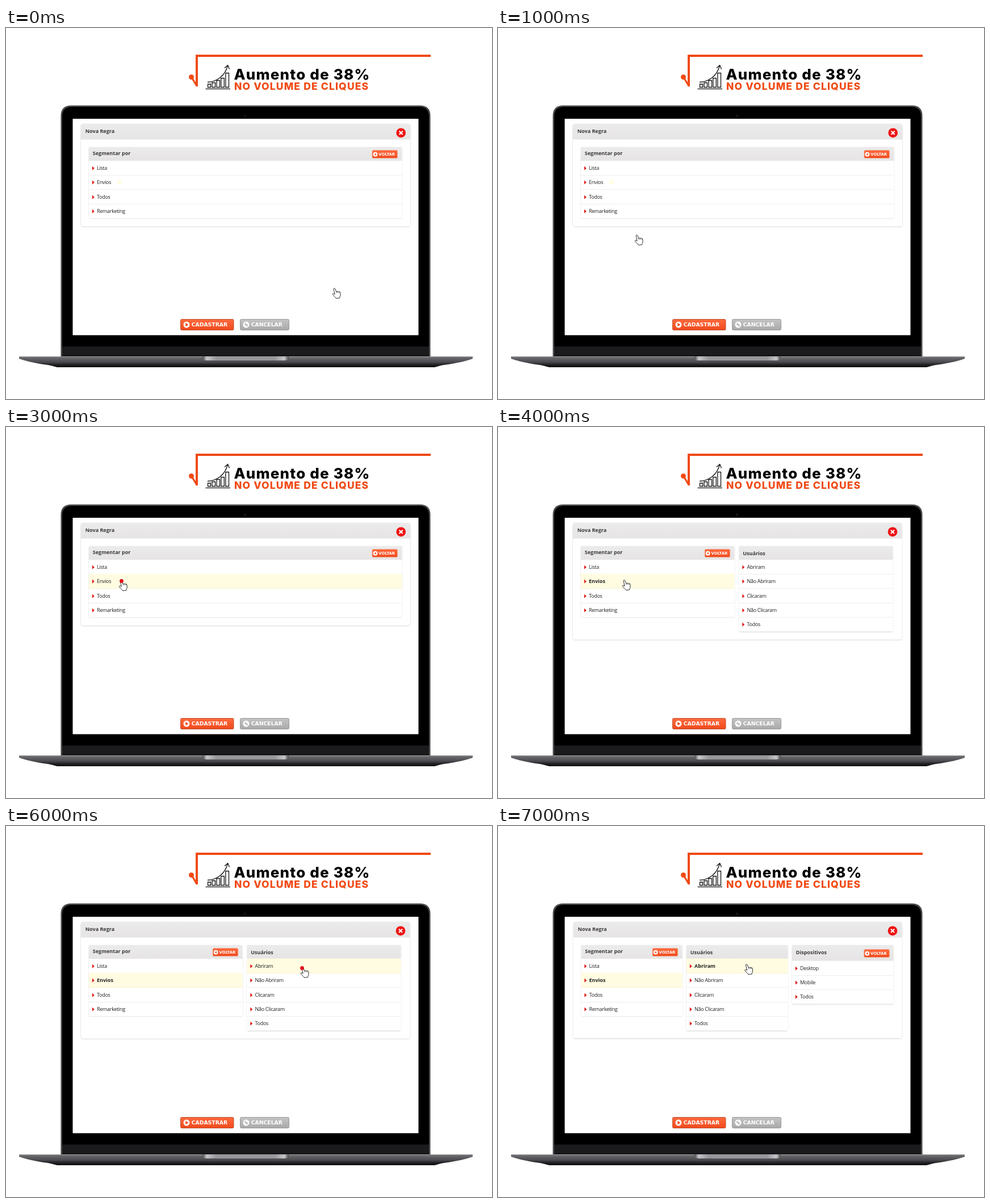
Animation of 856 by 654 pixels, one loop 8000 ms. Source, as an HTML page:

```html
<!DOCTYPE html>
<html lang="pt">
<head>
<meta charset="utf-8">
<style>
  html, body { margin: 0; width: 100%; height: 100%; overflow: hidden; background: #fff; }
  svg { display: block; width: 856px; height: 654px; }
  text { font-family: "Open Sans", sans-serif; font-size: 9px; fill: #3a3a3a; }
  .row { letter-spacing: -.3px; fill: #222; }
  .bold { font-weight: 700; }
  .chosen { fill: #222; }
  .btn { font: 700 9.3px "DejaVu Sans", sans-serif; fill: #fff; }
  .small { font-size: 6.8px; }
  .title { font: 800 26px Inter, sans-serif; letter-spacing: 1.2px; fill: #000; }
  .sub { font: 800 17.5px Inter, sans-serif; letter-spacing: 1.15px; fill: #f04a14; }
</style>
</head>
<body>
<svg viewBox="0 0 856 654">
  <defs>
    <linearGradient id="orange" x2="0" y2="1"><stop stop-color="#ff6a3e"/><stop offset="1" stop-color="#f04a1c"/></linearGradient>
    <linearGradient id="gray" x2="0" y2="1"><stop stop-color="#c4c4c4"/><stop offset="1" stop-color="#a9a9a9"/></linearGradient>
    <linearGradient id="head" x2="0" y2="1"><stop stop-color="#ecebeb"/><stop offset="1" stop-color="#e6e4e4"/></linearGradient>
    <linearGradient id="base" x2="0" y2="1">
      <stop stop-color="#8c8c90"/><stop offset=".15" stop-color="#66666a"/>
      <stop offset=".55" stop-color="#4b4b4f"/><stop offset=".8" stop-color="#222225"/><stop offset="1" stop-color="#111113"/>
    </linearGradient>
    <linearGradient id="notch">
      <stop stop-color="#4a4a4d"/><stop offset=".05" stop-color="#c6c6ca"/><stop offset=".16" stop-color="#98989c"/>
      <stop offset=".84" stop-color="#98989c"/><stop offset=".95" stop-color="#c6c6ca"/><stop offset="1" stop-color="#4a4a4d"/>
    </linearGradient>
    <filter id="shadow" x="-5%" y="-5%" width="110%" height="112%">
      <feDropShadow dx="0" dy=".7" stdDeviation="1.3" flood-color="#000" flood-opacity=".22"/>
    </filter>
  </defs>

  <!-- headline -->
  <g fill="none" stroke="#f04a14" stroke-width="4">
    <path d="M748 49H336V103"/>
    <path d="M327 87L336 102" stroke-width="3.2"/>
    <circle cx="326.5" cy="86.5" r="4.5" fill="#f04a14" stroke="none"/>
  </g>
  <g fill="none" stroke="#111" stroke-width="1.3">
    <path d="M351.5 107.3H395M355 95.5C372 95 386 84 390.5 66M385 70.5L390.7 65.5 393.5 72.5"/>
    <path d="M355.5 104.5V99H360.5V104.5ZM363 104.5V96.5H368.5V104.5ZM371 104.5V92.5H376.5V104.5ZM378.8 104.5V88.5H384.3V104.5ZM386.8 104.5V79.5H392.5V104.5Z"/>
  </g>
  <text class="title" x="401.5" y="91">Aumento de 38%</text>
  <text class="sub" x="402" y="108.5">NO VOLUME DE CLIQUES</text>

  <!-- laptop -->
  <path d="M96.5 579V155Q96.5 136.5 115 136.5H729Q747.5 136.5 747.5 155V579Z" fill="#48484b"/>
  <path d="M99 578V156Q99 139 116 139H728Q745 139 745 156V578Z" fill="#000"/>
  <path d="M99 561.5H745V577H99Z" fill="#1b1b1d"/>
  <circle cx="421" cy="154.5" r="2" fill="#15171c"/>
  <path d="M117.5 160H726.5V541.5H117.5Z" fill="#fff"/>
  <path d="M75 594H769L755 598H90Z" fill="#111"/>
  <path d="M23 579H822V583C805 589 775 595 740 597H105C70 595 40 589 23 583Z" fill="url(#base)"/>
  <path d="M346 579H498V582Q497 586 490 586H354Q347 586 346 582Z" fill="url(#notch)"/>

  <g id="view"></g>

  <!-- form buttons -->
  <g>
    <rect x="307.5" y="513.5" width="93.5" height="19" rx="2" fill="url(#orange)" stroke="#bd5230"/>
    <circle cx="318" cy="523" r="5.5" fill="#fff"/>
    <path d="M316.3 519.8L321.3 523 316.3 526.2Z" fill="#ee4a1c"/>
    <text class="btn" x="326.7" y="526.3">CADASTRAR</text>
    <rect x="412.5" y="513.5" width="86" height="19" rx="2" fill="url(#gray)" stroke="#9a9a9a"/>
    <circle cx="423" cy="523" r="5.5" fill="#fff"/>
    <path d="M420.7 521.2L425.3 525M421 523.8V521H423.6M425 522.2V525.3H422.4" fill="none" stroke="#aaa" stroke-width="1.1"/>
    <text class="btn" x="431.7" y="526.3">CANCELAR</text>
  </g>

  <g id="hand" stroke="#222" stroke-width=".95" stroke-linejoin="round">
    <path fill="#fff" d="M2.5 1.6Q3.8 -.2 5.2 1.5L7.2 6.8Q8.7 5.4 9.8 6.8 11.2 5.6 12.1 7 13.8 6.3 14.1 8L14.6 12Q14.5 14.6 13.2 16.6V18L6.9 18.6Q6 16.8 4.3 15.6L.8 11.7Q.7 9.6 2.7 10.2L4.6 11.4Z"/>
    <path fill="none" d="M7.2 6.8L7.9 9.4M9.8 6.8L10.3 9M12.1 7L12.5 8.8" stroke-width=".7"/>
  </g>
  <circle id="click" r="3.4" fill="#e3101c"/>
</svg>
<script>
const $ = id => document.getElementById(id);
const ROW = 25.3;
const SEGMENTS = ['Lista', 'Envios', 'Todos', 'Remarketing'];
const USERS = ['Abriram', 'Não Abriram', 'Clicaram', 'Não Clicaram', 'Todos'];
const DEVICES = ['Desktop', 'Mobile', 'Todos'];

// hand position for each second
const HAND = [[574.5, 458], [240.5, 364], [198.7, 270], [198.7, 270], [218.5, 269], [518.5, 248.7], [518.5, 248.7], [434, 243]];
const CLICKS = { 3: [203.5, 271.5], 6: [521.5, 250.5] };

const rect = (x, y, w, h, fill, more = '') =>
  `<rect x="${x}" y="${y}" width="${w}" height="${h}" fill="${fill}" ${more}/>`;
const text = (x, y, label, cls) => `<text x="${x}" y="${y}" class="${cls}">${label}</text>`;

const backButton = (x, y) =>
  rect(x + .5, y + .5, 44.5, 14, 'url(#orange)', 'rx="2" stroke="#f0a58e"') +
  `<circle cx="${x + 6}" cy="${y + 7.7}" r="3.9" fill="#fff"/>` +
  `<path d="M${x + 7.3} ${y + 5.6}v4.2l-3.3-2.1z" fill="#ee4a1c"/>` +
  text(x + 11.8, y + 10.1, 'VOLTAR', 'btn small');

// lit: highlighted row, bold: whether that row is already chosen
function table({ x, w, title, titleY = 223.7, rows, top = 234, lit = -1, bold, back, backY = 215 }) {
  const h = Math.round(rows.length * ROW);
  let out = rect(x, 210, w, top - 210 + h, '#fff', 'rx="2" filter="url(#shadow)" opacity=".7"') +
    rect(x, 210, w, top - 210, 'url(#head)') + text(x + 6.8, titleY, title, 'bold');
  rows.forEach((label, i) => {
    const y = Math.round(top + i * ROW);
    const chosen = i === lit;
    out += rect(x, y + 25, w, 1, '#eeeeee');
    if (chosen) out += rect(x, y - .5, w, 26, '#fffce2') + rect(x, y + 25, w, 1, '#f8f3d0');
    out += `<path d="M${x + 5.8} ${y + 9.6}l4 3.6-4 3.6z" fill="#e21a1a"/>` +
      text(x + 14, y + 15.5, label, bold && chosen ? 'bold chosen' : 'row');
  });
  return out + (back ? backButton(back, backY) : '');
}

function panel(x, right, bottom, closeX) {
  return rect(x, 169, right - x, bottom - 169, '#fff', 'rx="4" filter="url(#shadow)"') +
    `<path d="M${x} 196.5V173q0-4 4-4H${right - 4}q4 0 4 4V196.5z" fill="url(#head)"/>` +
    text(x + 7.8, 185, 'Nova Regra', 'bold') +
    `<circle cx="${closeX}" cy="184.8" r="8.4" fill="#ee1515"/>` +
    `<path d="M${closeX - 3} 181.8l6 6m0-6l-6 6" stroke="#fff" stroke-width="2.2"/>`;
}

function view(step) {
  const segments = { title: 'Segmentar por', rows: SEGMENTS, lit: 1, bold: true };
  const users = { title: 'Usuários', titleY: 225.5, rows: USERS };
  if (step < 4) {
    const hover = step > 1;
    return panel(132, 712, 349.5, 695.7) +
      table({ ...segments, x: 146, w: 551.5, lit: hover ? 1 : -1, bold: false, back: 644.5 }) +
      (hover ? '' : rect(196, 267, 8, 9, '#fffde6', 'rx="3"'));
  }
  if (step < 7) {
    return panel(132, 711.5, 374.5, 695) +
      table({ ...segments, x: 146, w: 270.5, back: 363.7 }) +
      table({ ...users, x: 424.5, w: 271, lit: step > 4 ? 0 : -1 });
  }
  return panel(132.7, 711.5, 374, 695) +
    table({ ...segments, x: 146.5, w: 178, back: 271.7 }) +
    table({ ...users, x: 332, w: 178.5, lit: 0, bold: true }) +
    table({ x: 518, w: 178.5, title: 'Dispositivos', titleY: 225.5, rows: DEVICES, top: 237.7, back: 644.3, backY: 217 });
}

let shown = -1;
function draw() {
  const step = Math.floor(performance.now() / 1000) % 8;
  if (step !== shown) {
    shown = step;
    $('view').innerHTML = view(step);
    $('hand').setAttribute('transform', `translate(${HAND[step]})`);
    const click = CLICKS[step];
    $('click').setAttribute('visibility', click ? 'visible' : 'hidden');
    if (click) $('click').setAttribute('transform', `translate(${click})`);
  }
  requestAnimationFrame(draw);
}
draw();
</script>
</body>
</html>
```
